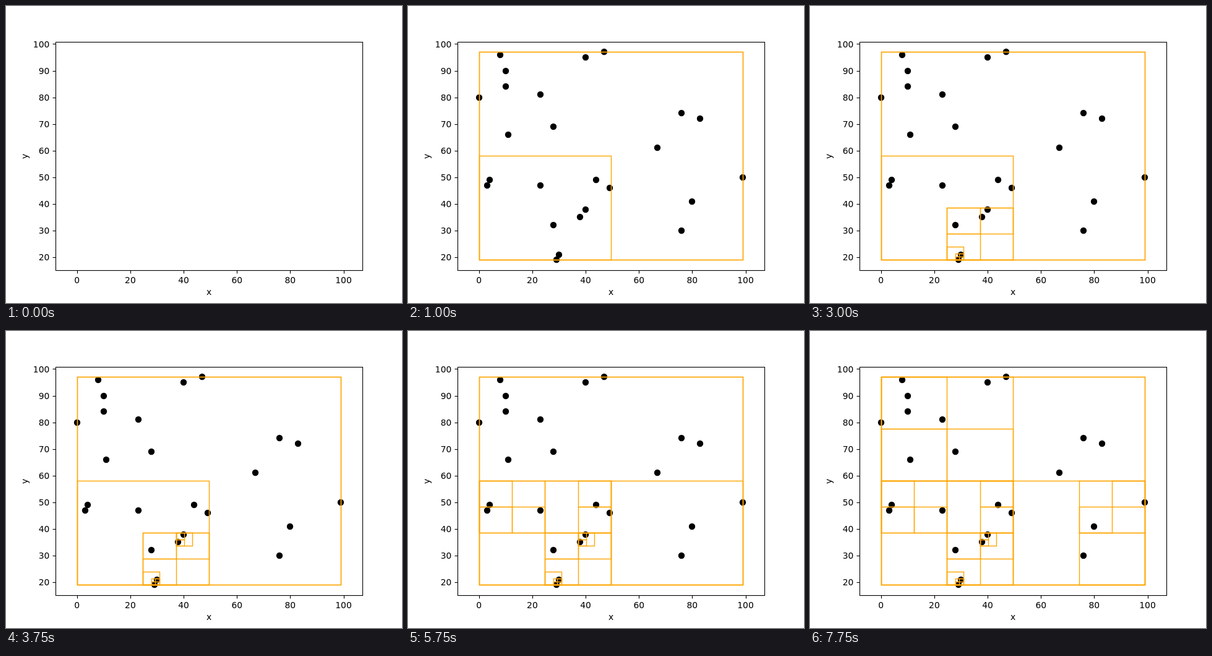
An HTML page for the animation above (8000 ms loop, 640x480 px).

```html
<!DOCTYPE html>
<html lang="en">
<head>
<meta charset="utf-8">
<title>Quadtree</title>
<style>
  html, body { margin: 0; width: 100%; height: 100%; overflow: hidden; background: #fff; }
  svg { display: block; }
  text { font: 13.89px "DejaVu Sans", sans-serif; fill: #000; }
  .axis { fill: none; stroke: #000; stroke-width: 1.11; }
  .cell { fill: none; stroke: #ffa500; stroke-width: 1.389; }
</style>
</head>
<body>
<svg id="plot" width="640" height="480" viewBox="0 0 640 480"></svg>
<script>
const STEP = 250, LOOP = 8000;
const SCALE = 369.6 / 85.8;
const points = [
  [8, 96], [10, 90], [10, 84], [23, 81], [40, 95], [47, 97], [0, 80], [28, 69], [11, 66],
  [76, 74], [83, 72], [67, 61], [4, 49], [3, 47], [23, 47], [44, 49], [49, 46], [99, 50],
  [80, 41], [40, 38], [38, 35], [28, 32], [76, 30], [30, 21], [29, 19]
];

const plot = document.getElementById('plot');
const px = x => 328 + (x - 49.5) * SCALE;
const py = y => 57.6 + (100.9 - y) * SCALE;
const snap = v => Math.floor(v + 0.5) + 0.5;

function add(parent, tag, attrs, text) {
  const el = document.createElementNS('http://www.w3.org/2000/svg', tag);
  for (const key in attrs) el.setAttribute(key, attrs[key]);
  if (text !== undefined) el.textContent = text;
  parent.appendChild(el);
  return el;
}

// Depth-first list of the non-empty cells: SW, SE, NW, NE
function split(x0, y0, x1, y1, pts, out) {
  if (!pts.length) return out;
  out.push([x0, y0, x1, y1]);
  if (pts.length === 1) return out;
  const mx = (x0 + x1) / 2, my = (y0 + y1) / 2;
  for (const north of [false, true]) {
    for (const east of [false, true]) {
      const inside = pts.filter(([x, y]) => x >= mx === east && y >= my === north);
      split(east ? mx : x0, north ? my : y0, east ? x1 : mx, north ? y1 : my, inside, out);
    }
  }
  return out;
}

function drawAxes() {
  add(plot, 'rect', { class: 'axis', x: 80.5, y: 58.5, width: 496, height: 369 - 0 });
  for (let x = 0; x <= 100; x += 20) {
    add(plot, 'path', { class: 'axis', d: `M${snap(px(x))} 427.5v5` });
    add(plot, 'text', { x: px(x), y: 448, 'text-anchor': 'middle' }, x);
  }
  for (let y = 20; y <= 100; y += 10) {
    add(plot, 'path', { class: 'axis', d: `M80.5 ${snap(py(y))}h-5` });
    add(plot, 'text', { x: 70.3, y: Math.round(py(y) + 5.3), 'text-anchor': 'end' }, y);
  }
  add(plot, 'text', { x: 328, y: 467, 'text-anchor': 'middle' }, 'x');
  add(plot, 'text', { transform: 'translate(35 243) rotate(-90)', 'text-anchor': 'middle' }, 'y');
}

function drawDots() {
  const dots = add(plot, 'g', {});
  for (const [x, y] of points) {
    add(dots, 'circle', { cx: Math.round(px(x)), cy: Math.round(py(y)), r: 5.2 });
  }
  return dots;
}

function drawCell([x0, y0, x1, y1]) {
  const left = snap(px(x0)), top = snap(py(y1));
  return add(plot, 'rect', {
    class: 'cell', x: left, y: top,
    width: snap(px(x1)) - left, height: snap(py(y0)) - top
  });
}

const bounds = [0, 19, 99, 97];
const cells = [bounds, ...split(...bounds, points, [])];
const layers = [drawDots(), ...cells.slice(0, LOOP / STEP - 2).map(drawCell)];
drawAxes();

// One more layer appears at every step
function show(time) {
  const step = Math.floor(time % LOOP / STEP);
  layers.forEach((el, i) => el.setAttribute('visibility', i < step ? 'visible' : 'hidden'));
}

function tick() {
  show(performance.now());
  requestAnimationFrame(tick);
}
tick();
</script>
</body>
</html>
```
